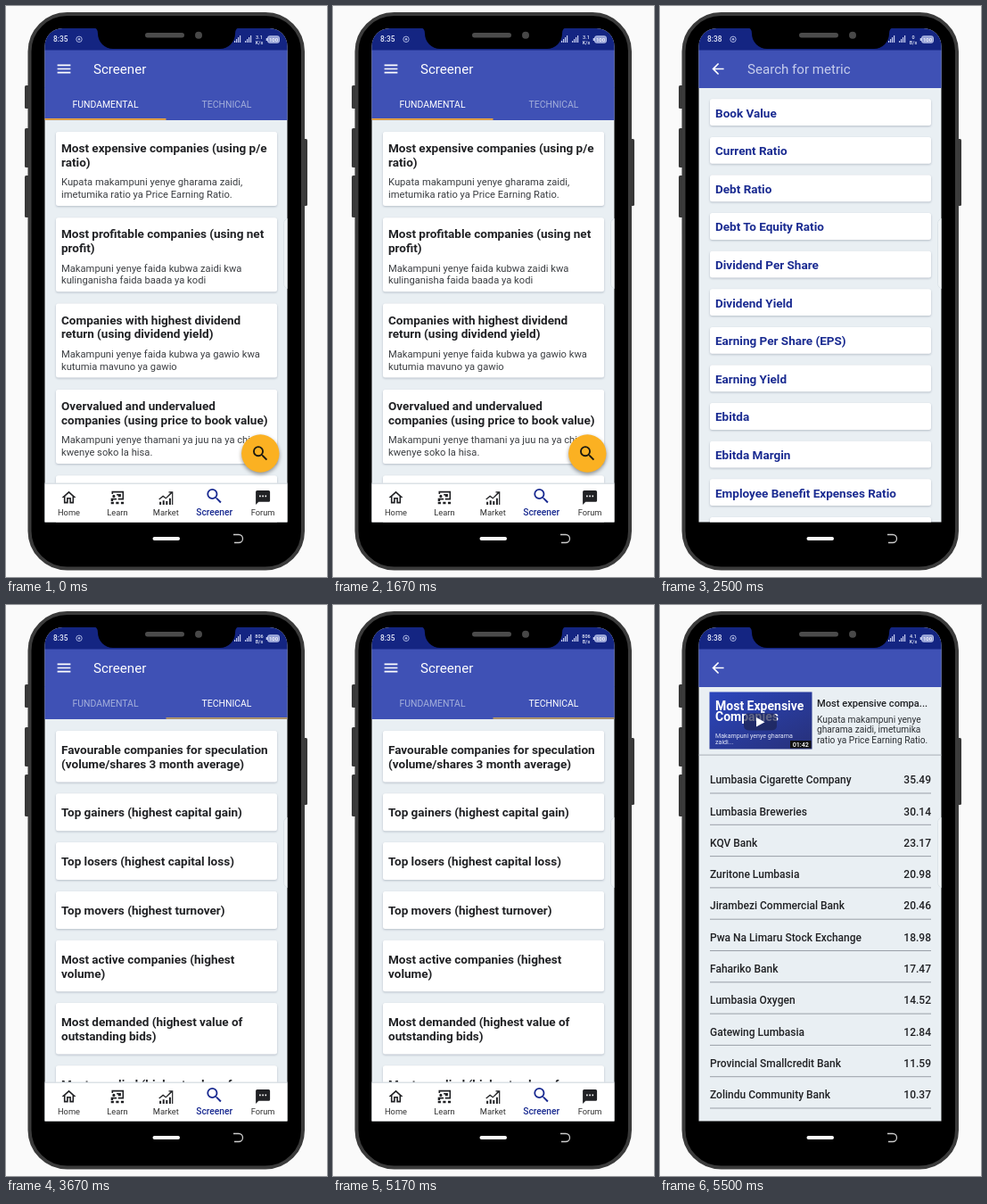
These frames come from a looping animation (360x640 px, 7170 ms). An HTML page:

```html
<!DOCTYPE html>
<html lang="en">
<head>
<meta charset="utf-8">
<style>
html, body { margin: 0; width: 100%; height: 100%; overflow: hidden; background: #fafafa; }
svg { display: block; width: 360px; height: 640px; font-family: Roboto, sans-serif; }
.card { fill: #fff; filter: drop-shadow(0 1px 1px #00143038); }
.fab { filter: drop-shadow(0 2px 2px #0006); }
</style>
</head>
<body>
<svg id="stage" viewBox="0 0 360 640"></svg>
<script>
const stage = document.getElementById('stage');
const LOOP = 7170;
const STARTS = [0, 1830, 3670, 5330];
const INK = '#202124', NAVY = '#1a2b91', INDIGO = '#3f51b5', PALE = '#a3aedb';
const TITLE = 13.52;

const paths = {
  menu: 'M3 18h18v-2H3zm0-5h18v-2H3zm0-7v2h18V6z',
  back: 'M20 11H7.83l5.59-5.59L12 4l-8 8 8 8 1.41-1.41L7.83 13H20z',
  home: 'M12 5.69l5 4.5V18h-2v-6H9v6H7v-7.81l5-4.5M12 3L2 12h3v8h6v-6h2v6h6v-8h3z',
  learn: 'M4 3h17v12h-8v-2h6V5H6v2H4zM7 8a2 2 0 1 1 0 4 2 2 0 1 1 0-4M3 13h8v2H6v2H3zM11 7h6v4h-4v-2h-2zM3 18h4v3H3zM10 18h4v3h-4zM17 18h4v3h-4z',
  market: 'M3 18h2.5v4H3zM7.500 16H10v6H7.500zM12 17h2.500v5H12zM16.500 13H19v9h-2.500zM20.500 9H22v13h-1.500zM2 14l6-5 4 3 6.500-7H16V3.500h6V9h-1.500V6L12 14l-4-3-5 4z',
  search: 'M15.5 14h-.79l-.28-.27A6.47 6.47 0 0 0 16 9.5 6.5 6.5 0 1 0 9.5 16c1.61 0 3.09-.59 4.23-1.57l.27.28v.79l5 4.99L20.49 19zm-6 0C7.01 14 5 11.99 5 9.5S7.01 5 9.5 5 14 7.01 14 9.5 11.99 14 9.5 14z',
  chat: 'M20 2H4c-1.1 0-2 .9-2 2v18l4-4h14c1.1 0 2-.9 2-2V4c0-1.1-.9-2-2-2zM9 11H7V9h2zm4 0h-2V9h2zm4 0h-2V9h2z'
};

const rect = (x, y, w, h, fill, r = 0, more = '') =>
  `<rect x="${x}" y="${y}" width="${w}" height="${h}" rx="${r}" fill="${fill}" ${more}/>`;
const text = (x, y, size, str, fill = INK, weight = 400, anchor = 'start') =>
  `<text x="${x}" y="${y}" font-size="${size}" fill="${fill}" font-weight="${weight}" text-anchor="${anchor}">${str}</text>`;
const lines = (x, y, step, size, list, ...style) =>
  list.map((s, i) => text(x, y + i * step, size, s, ...style)).join('');
const icon = (name, x, y, scale, fill) =>
  `<path d="${paths[name]}" fill="${fill}" transform="translate(${x} ${y}) scale(${scale}) translate(-12 -12)"/>`;
const card = (y, h) => rect(56, y, 248, h, '#fff', 2.5, 'class="card"');

function signal(x) {
  return [2, 4, 6, 8].map((h, i) => rect(x + i * 2, 41 - h, 1.2, h, '#c5cdf0')).join('');
}

function statusBar(clock, rate, unit) {
  return rect(43, 24, 273, 25.5, '#142582') +
    text(53, 40.2, 8.3, clock, '#e6eafa', 500) +
    '<circle cx="82" cy="37.3" r="3.2" fill="none" stroke="#aab4e0"/><circle cx="82" cy="37.3" r="1.2" fill="#aab4e0"/>' +
    signal(256) + signal(268) +
    text(284, 36.5, 5.5, rate, '#e6eafa', 500, 'middle') + text(284, 43, 5.5, unit, '#e6eafa', 500, 'middle') +
    rect(293.5, 33.8, 13, 7.4, '#8f9bd3', 2, 'stroke="#c5cdf0" stroke-width=".9"') +
    rect(291.7, 36, 1.3, 3, '#c5cdf0') + text(300, 39.8, 6, '100', '#fff', 500, 'middle');
}

function header(iconName, title, fill) {
  return rect(43, 49, 273, 43, INDIGO) + icon(iconName, 65, 70.5, .82, '#fff') + text(98, 76, 15.1, title, fill);
}

function tabs(active) {
  return rect(43, 91, 273, 37, INDIGO) +
    ['FUNDAMENTAL', 'TECHNICAL'].map((s, i) =>
      text(111.5 + i * 136, 114, 10.45, s, i === active ? '#fff' : PALE, 400, 'middle')).join('') +
    rect(43 + active * 136.5, 126, 136.5, 1.8, active ? '#b99a62' : '#f2a93b');
}

function bottomNav() {
  const items = [['home', 'Home'], ['learn', 'Learn'], ['market', 'Market'], ['search', 'Screener'], ['chat', 'Forum']];
  return rect(43, 534.5, 273, 1.5, '#dbe1e6') + rect(43, 536, 273, 43, '#fff') +
    items.map(([name, label], i) => {
      const on = i === 3, x = 70.5 + i * 54.4;
      return icon(name, x, on ? 549.3 : 551, on ? .93 : .8, on ? NAVY : INK) +
        text(x, 571, on ? 10.3 : 9.3, label, on ? NAVY : '#333', on ? 500 : 400, 'middle');
    }).join('');
}

const edgeHandle = rect(311.5, 238.5, 12, 78, '#f0f4f6', 5, 'stroke="#dce3e8"');

function fundamental() {
  const items = [
    ['Most expensive companies (using p/e', 'ratio)', 'Kupata makampuni yenye gharama zaidi,', 'imetumika ratio ya Price Earning Ratio.'],
    ['Most profitable companies (using net', 'profit)', 'Makampuni yenye faida kubwa zaidi kwa', 'kulinganisha faida baada ya kodi'],
    ['Companies with highest dividend', 'return (using dividend yield)', 'Makampuni yenye faida kubwa ya gawio kwa', 'kutumia mavuno ya gawio'],
    ['Overvalued and undervalued', 'companies (using price to book value)', 'Makampuni yenye thamani ya juu na ya chini', 'kwenye soko la hisa.'],
    []
  ];
  return edgeHandle + items.map((s, i) => {
    const y = 141 + i * 96.3;
    return card(y, 83) + lines(62, y + 23, 15.8, TITLE, s.slice(0, 2), INK, 700) +
      lines(62, y + 60.3, 13.7, 11.2, s.slice(2), '#3c3f43');
  }).join('') +
    '<circle cx="285.3" cy="501.5" r="21.2" fill="#fbb122" class="fab"/>' + icon('search', 285.3, 501.5, .92, '#1c1a10') +
    header('menu', 'Screener', '#fff') + tabs(0) + bottomNav() + statusBar('8:35', '3.1', 'K/s');
}

function metrics() {
  const names = ['Book Value', 'Current Ratio', 'Debt Ratio', 'Debt To Equity Ratio', 'Dividend Per Share',
    'Dividend Yield', 'Earning Per Share (EPS)', 'Earning Yield', 'Ebitda', 'Ebitda Margin',
    'Employee Benefit Expenses Ratio', ''];
  return edgeHandle + names.map((s, i) => {
    const y = 104.3 + i * 42.6;
    return card(y, 29.8) + text(62, y + 20.2, TITLE, s, NAVY, 700);
  }).join('') + header('back', 'Search for metric', '#c6cdec') + statusBar('8:38', '0', 'B/s');
}

function technical() {
  const items = [
    ['Favourable companies for speculation', '(volume/shares 3 month average)'],
    ['Top gainers (highest capital gain)'],
    ['Top losers (highest capital loss)'],
    ['Top movers (highest turnover)'],
    ['Most active companies (highest', 'volume)'],
    ['Most demanded (highest value of', 'outstanding bids)'],
    ['Most supplied (highest value of', 'outstanding offers)']
  ];
  let y = 141, out = edgeHandle;
  for (const s of items) {
    const h = s.length > 1 ? 57.5 : 42;
    out += card(y, h) + lines(62, y + 26, 15.8, TITLE, s, INK, 700);
    y += h + 12.8;
  }
  return out + header('menu', 'Screener', '#fff') + tabs(1) + bottomNav() + statusBar('8:35', '806', 'B/s');
}

function ranking() {
  const rows = [
    ['Lumbasia Cigarette Company', '35.49'], ['Lumbasia Breweries', '30.14'], ['KQV Bank', '23.17'],
    ['Zuritone Lumbasia', '20.98'], ['Jirambezi Commercial Bank', '20.46'],
    ['Pwa Na Limaru Stock Exchange', '18.98'], ['Fahariko Bank', '17.47'], ['Lumbasia Oxygen', '14.52'],
    ['Gatewing Lumbasia', '12.84'], ['Provincial Smallcredit Bank', '11.59'], ['Zolindu Community Bank', '10.37']
  ];
  return edgeHandle +
    rect(55.5, 97.5, 115, 64, 'url(#thumb)') +
    lines(62, 118, 12.3, 14, ['Most Expensive', 'Companies'], '#fff', 700) +
    lines(62, 149, 7, 7.1, ['Makampuni yenye gharama', 'zaidi...'], '#e4e8fa') +
    rect(94, 121.5, 37, 19, '#1c2452b0', 5) + '<path d="M108 126v10.5l9.5-5.2z" fill="#fff"/>' +
    rect(146, 152, 23.5, 8.5, '#111') + text(157.8, 158.8, 7.2, '01:42', '#fff', 500, 'middle') +
    text(176, 114.3, 11.1, 'Most expensive compa...', INK, 500) +
    lines(176, 131.6, 11.6, 10.2, ['Kupata makampuni yenye', 'gharama zaidi, imetumika', 'ratio ya Price Earning Ratio.'], '#2d3034') +
    rect(43, 167.6, 273, 1, '#a9afb6') +
    rows.map(([name, value], i) => {
      const y = 200.2 + i * 35.3;
      return text(56, y, 12, name, INK, 500) + text(304, y, 12, value, INK, 500, 'end') +
        rect(56, y + 10.3, 248, 1, '#9aa0a8');
    }).join('') + header('back', '', '#fff') + statusBar('8:38', '4.1', 'K/s');
}

const buttons = [[21, 89, 26], [21, 137, 44], [21, 190, 47], [332, 149, 75]]
  .map(([x, y, h]) => rect(x, y, 6, h, '#383838', 1.5)).join('');

stage.innerHTML = `
  <defs>
    <clipPath id="screen"><path d="M43.5 578.5V45a20 20 0 0 1 20-20H295.500a20 20 0 0 1 20 20V578.500z"/></clipPath>
    <linearGradient id="thumb" x2="1" y2="1"><stop stop-color="#2b46bd"/><stop offset="1" stop-color="#273079"/></linearGradient>
  </defs>
  ${buttons}
  ${rect(26.5, 9, 306.5, 621.5, '#000', 42, 'stroke="#3b3b3b" stroke-width="4"')}
  <g clip-path="url(#screen)">
    ${rect(43, 24, 273, 555, '#e9eff3')}
    ${[fundamental, metrics, technical, ranking].map(draw => `<g class="view">${draw()}</g>`).join('')}
  </g>
  <path d="M97 24q6 0 6 7a17 17 0 0 0 17 17H240a17 17 0 0 0 17-17q0-7 6-7z" fill="#000"/>
  ${rect(156, 30, 44, 5.5, '#4b4b4b', 2.75)}
  <circle cx="216" cy="32.7" r="4" fill="#484848"/>
  ${rect(164.5, 595, 30.5, 4, '#fff', 2)}
  <path d="M255 592.500h6a4.400 4.400 0 0 1 0 9h-5" fill="none" stroke="#ccc" stroke-width="1.3"/>`;

const views = [...stage.querySelectorAll('.view')];
function frame() {
  const t = performance.now() % LOOP;
  const current = STARTS.filter(s => s <= t).length - 1;
  views.forEach((v, i) => v.setAttribute('display', i === current ? 'inline' : 'none'));
  requestAnimationFrame(frame);
}
frame();
</script>
</body>
</html>
```
